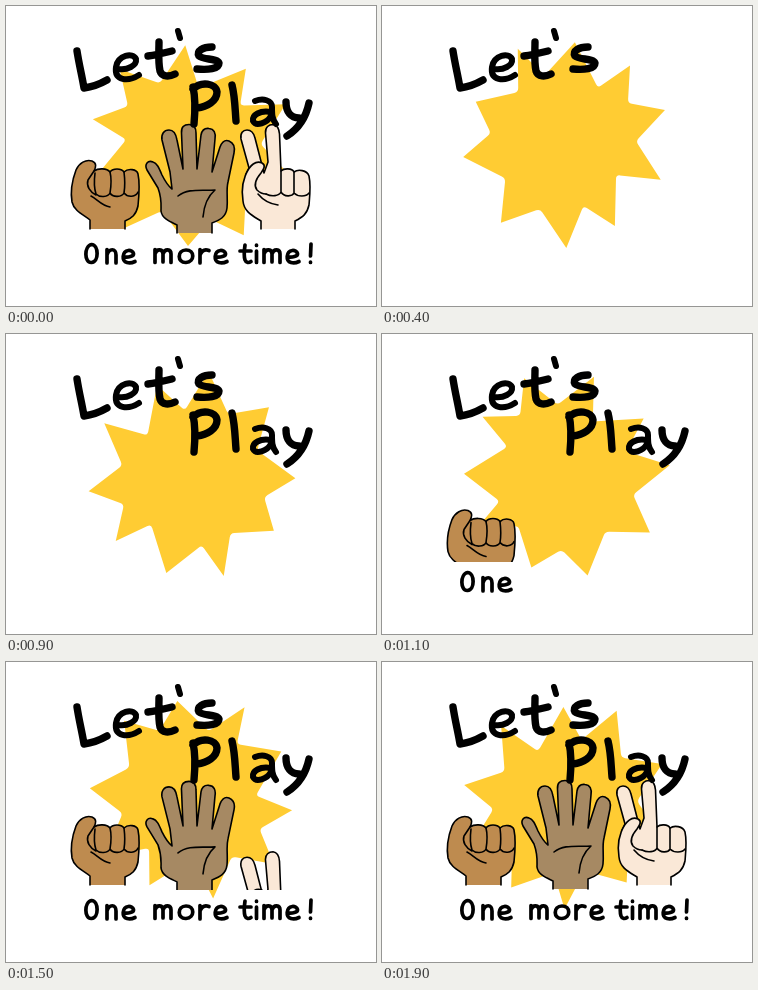
An HTML page for the animation above (2000 ms loop, 370 by 300 pixels).

```html
<!DOCTYPE html>
<html lang="en">
<head>
<meta charset="utf-8">
<title>Let's Play</title>
<style>
html, body { margin: 0; width: 100%; height: 100%; overflow: hidden; background: #fff; }
svg { display: block; width: 370px; height: 300px; }
g { stroke-linecap: round; stroke-linejoin: round; }
.hand { stroke: #000; stroke-width: 1.6; }
.line { fill: none; }
.big { fill: none; stroke: #000; stroke-width: 7.4; }
.small { fill: none; stroke: #000; stroke-width: 3.7; }
.thin { stroke-width: 6; }
</style>
</head>
<body>
<svg viewBox="0 0 370 300" role="img" aria-label="Let's Play One more time!">
  <defs>
    <clipPath id="floor"><rect width="370" height="228"/></clipPath>
    <path id="e" d="M2 7.500C6 8 12 7 11.500 4C10.500 0 2-1 1.200 7C.6 14 8 14.500 13 12"/>
    <path id="m" d="M0 .5V13.500M0 5C2-1 8 0 8 5V13M8 5C10-1 16 0 16 5V13.500"/>
  </defs>

  <path id="star" fill="#ffcc33"/>

  <g clip-path="url(#floor)">
    <g id="rock" class="hand">
      <path fill="#be8b4f" d="M84 223V214C78 209 68 205 66 196C64 184 67 172 70 164C73 157 80 153 86 155C91 157 90 161 88 165C92 162 101 162 104 166C107 162 115 162 118 166C122 162 131 163 132 168C134 177 133 190 132 200C130 209 126 212 119 215V223"/>
      <path class="line" d="M88 165L82 174C80 180 84 186 90 189M89 167C88 175 88 182 90 188C94 192 102 191 104 187M104 166C106 174 105 181 104 187C107 192 116 191 118 187M118 166C119 174 119 181 118 187C122 192 130 191 132 186M85 190C91 193 96 200 104 201"/>
    </g>
    <g id="paper" class="hand">
      <path fill="#a68963" d="M171 227V219C165 216 156 213 155 205C155 199 156 193 152 182L141 164C138 158 142 154 147 156C151 157 153 162 156 169C159 175 162 180 166 183L164 166L156 134C155 128 158 124 163 124C168 124 170 128 171 134L177 163L175.500 127C175 121 178 118.500 183 118.500C188 118.500 190 122 190 127L191 163L195 129C196 124 199 122 203 122.500C208 123 210 127 209 133L206 166L214 141C216 136 219 133.500 223 135C228 137 229 142 228 147L222 176C220 184 222 192 221 202C220 211 214 214 206 217V227"/>
      <path class="line" d="M172 190C182 182 195 185 209 184C202 190 198 199 197 211"/>
    </g>
    <g id="scissors" class="hand">
      <path fill="#fae8d7" d="M255 223V215C247 210 238 206 237 195C235 183 237 172 243 162L235 133C234 127 237 124 241 124C246 124 248 128 249 132L258 167L262 156L259.500 127C259 121 263 118.500 267 118.500C271 119 273 122 273.500 128L275 165C278 162 286 162 288 166C292 163 301 164 303 170C305 179 304 188 303 199C301 208 297 211 289 215V223"/>
      <path fill="#fae8d7" d="M240 168C244 159 250 154 256 157C260 159 258 163 255 167C249 174 248 180 251 184C254 187 257 188 260 188"/>
      <path class="line" d="M260 188C266 191 273 190 275 186V165M275 186C278 191 286 191 288 187V166M288 187C292 191 300 191 303 187M252 188C257 194 264 198 272 199"/>
    </g>
  </g>

  <g id="lets" class="big">
    <path d="M71 45C73 58 76 70 78 82C86 81 94 78 101 74"/>
    <path class="thin" d="M113 63C121 64 131 60 130 53C127 46 112 49 110 61C108 75 122 76 133 69"/>
    <path d="M153 36C153 46 152 56 154 65C156 71 163 71 169 68M142 50C150 49 158 47 166 45"/>
    <path class="thin" d="M172 25L174 32"/>
    <path d="M206 41C197 41 190 45 193 50C197 54 211 52 213 57C213 63 202 64 191 63"/>
  </g>
  <g id="play" class="big">
    <path d="M187 81C190 94 189 107 188 118M187 83C195 75 210 77 211 86C211 95 201 101 191 102"/>
    <path d="M226 79C229 91 229 103 230 115"/>
    <path class="thin" d="M249 95C257 92 266 94 266 101C266 108 266 113 270 118M265 106C254 104 246 109 247 115C250 121 261 117 265 110"/>
    <path d="M280 96C280 106 285 112 293 112M303 97C300 111 292 123 281 130"/>
  </g>

  <g class="small">
    <g id="one">
      <path d="M85.500 238.500C78 240 78 257 85.500 256.500C93 256 93 239 85.500 238.500Z"/>
      <path d="M101 243.500V257M101 249C103 242 110 242 110 249V257"/>
      <use href="#e" x="116" y="243.500"/>
    </g>
    <g id="more">
      <use href="#m" x="149" y="243"/>
      <path d="M180 244C171 244 171 257 180 256.500C189 256 189 244 180 244Z"/>
      <path d="M194 243.500V257M194 249C196 244 199 243 203 244.500"/>
      <use href="#e" x="208" y="243.500"/>
    </g>
    <g id="time">
      <path d="M239 239C238 246 238 251 239 254C240 257 243 257 245 255.500M234 245H245"/>
      <path d="M250.500 245V256.500M250.500 239V239.500"/>
      <use href="#m" x="258" y="243"/>
      <use href="#e" x="280" y="243.500"/>
      <path d="M305 238L304.500 250M304.500 256V256.500"/>
    </g>
  </g>
</svg>
<script>
const LOOP = 2000, STEP = 100;
const CX = 185, CY = 139;
const $ = id => document.getElementById(id);

// Polar corners: [degrees, radius]
const tips = [[0, 102], [43, 104.5], [75, 101], [112.5, 108], [144, 103],
  [178, 101.5], [210, 104], [250, 100], [289, 94], [320, 103]];
const dents = [[21.3, 70], [58.4, 77], [97, 72], [121.7, 73], [168, 65],
  [195, 74], [226.5, 69], [261, 57.5], [304.5, 63], [342.5, 69.5]];

// id, start, travel
const hands = [['rock', 930, 75], ['paper', 1100, 112], ['scissors', 1430, 112]];
const RISE = 500;

// id, moment of appearing
const words = [['lets', 200], ['play', 600], ['one', 1000], ['more', 1200], ['time', 1500]];

const polar = ([deg, r]) => {
  const a = deg * Math.PI / 180;
  return [r * Math.cos(a), r * Math.sin(a)];
};
const toward = (a, b, dist) => {
  const dx = b[0] - a[0], dy = b[1] - a[1], k = dist / Math.hypot(dx, dy);
  return [a[0] + dx * k, a[1] + dy * k];
};
const pt = p => p.map(v => v.toFixed(2)).join(' ');

// Sharp tips, softly rounded dents
function starPath() {
  const outer = tips.map(polar), inner = dents.map(polar);
  return outer.map((tip, i) => {
    const dent = inner[i], next = outer[(i + 1) % outer.length];
    return (i ? 'L' : 'M') + pt(tip) + 'L' + pt(toward(dent, tip, 4)) +
      'Q' + pt(dent) + ' ' + pt(toward(dent, next, 4));
  }).join('') + 'Z';
}

function draw(ms) {
  const now = Math.floor(ms % LOOP / STEP) * STEP;
  const t = now || LOOP; // the opening picture is the finished scene
  const turn = 16.7 + 720 * (t - STEP) / (LOOP - STEP);
  $('star').setAttribute('transform', `translate(${CX} ${CY}) rotate(${turn})`);
  for (const [id, start, travel] of hands) {
    const x = Math.min(1, Math.max(0, (t - start) / RISE));
    $(id).setAttribute('transform', `translate(0 ${travel * (1 - x) ** 3})`);
    $(id).setAttribute('visibility', x > 0 ? 'visible' : 'hidden');
  }
  for (const [id, at] of words) {
    $(id).setAttribute('visibility', t >= at ? 'visible' : 'hidden');
  }
}

$('star').setAttribute('d', starPath());
const begin = performance.now();
function tick() {
  draw(performance.now() - begin);
  requestAnimationFrame(tick);
}
tick();
</script>
</body>
</html>
```
